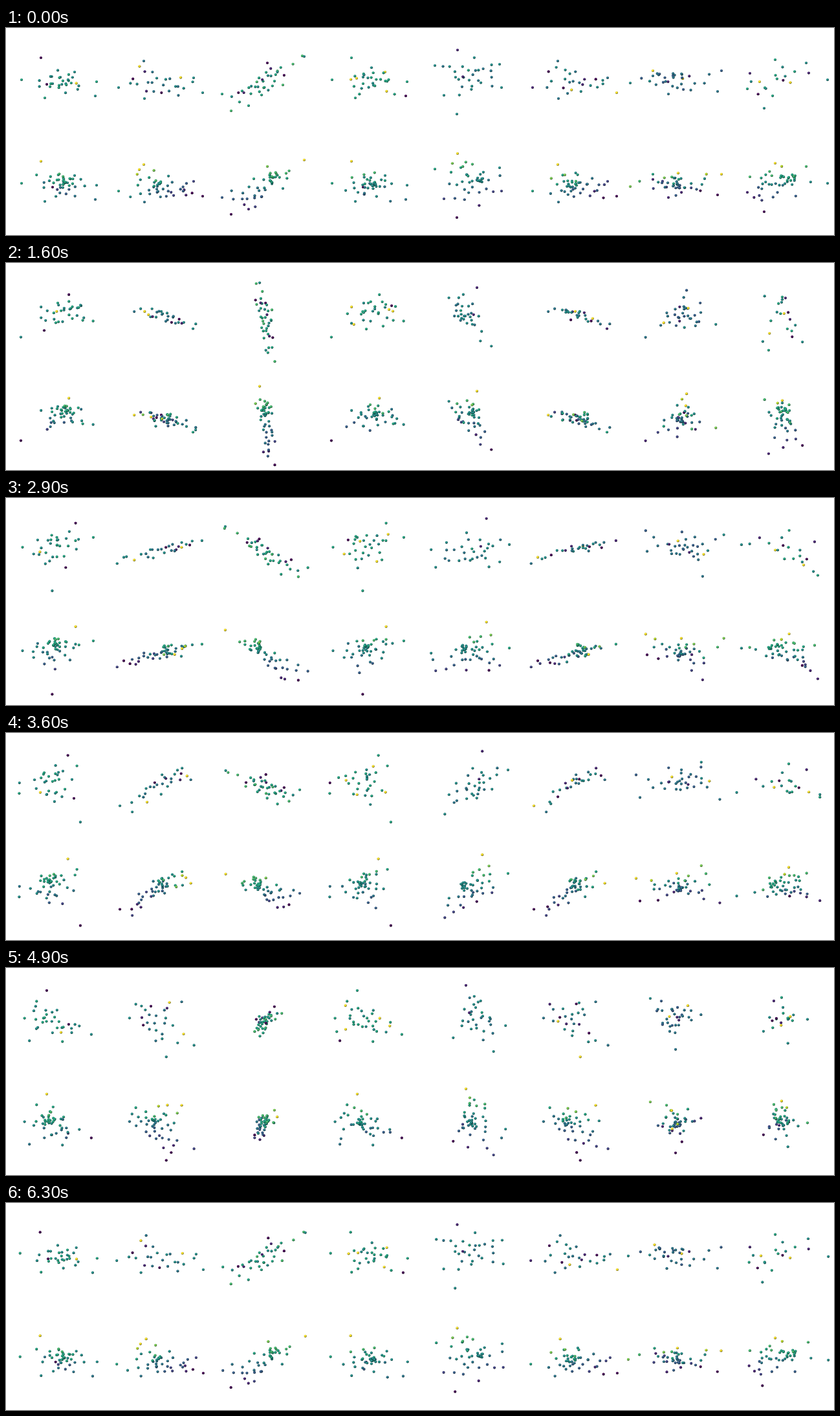
Recreate the animation shown at these times as an HTML page. Size 1280x320 px, loop 6.4 s.

```html
<!DOCTYPE html>
<html lang="en">
<head>
<meta charset="utf-8">
<title>Orbiting point clouds</title>
<style>
  html, body { margin: 0; width: 100%; height: 100%; overflow: hidden; background: #fff; }
  #stage { display: block; width: 1280px; height: 320px; }
</style>
</head>
<body>
<svg id="stage" viewBox="0 0 1280 320"><defs id="defs"></defs></svg>
<script>
const NS = 'http://www.w3.org/2000/svg';
const LOOP = 6400, STEPS = 64, CELL = 160;
const FOCUS = 298, SIN = 0.41, COS = 0.912; // perspective distance and camera tilt
const VIRIDIS = ['#440154', '#482475', '#414487', '#355f8d', '#2a788e', '#21918c',
  '#22a884', '#44bf70', '#7ad151', '#bddf26', '#fde725'];
const TOP_LEVEL = VIRIDIS.length - 1;

const stage = document.getElementById('stage');
const defs = document.getElementById('defs');

function add(parent, tag, attrs) {
  const el = document.createElementNS(NS, tag);
  for (const key in attrs) el.setAttribute(key, attrs[key]);
  return parent.appendChild(el);
}

function randomFrom(seed) {
  return () => {
    seed = (seed + 0x6D2B79F5) | 0;
    let t = Math.imul(seed ^ (seed >>> 15), 1 | seed);
    t = (t + Math.imul(t ^ (t >>> 7), 61 | t)) ^ t;
    return ((t ^ (t >>> 14)) >>> 0) / 4294967296;
  };
}

VIRIDIS.forEach((color, i) => {
  const ball = add(defs, 'radialGradient', { id: 'ball' + i, cx: .42, cy: .36, r: .64 });
  const stop = (offset, tint) =>
    add(ball, 'stop', { offset, style: `stop-color:color-mix(in srgb, ${color}, ${tint})` });
  stop(0, 'white 12%');
  stop(.45, 'black 5%');
  stop(1, 'black 65%');
});

// Starting view (x right, y down, d towards the viewer) to world coordinates.
function toWorld([x, y, d]) {
  const z = (-y * (FOCUS - d * COS) + FOCUS * d * SIN) / (FOCUS * COS - y * SIN);
  return { x: x * (FOCUS - d * COS - z * SIN) / FOCUS, d, z };
}

// A shape is its dense core followed by its outermost tips.
function shape(tone, atoms, core, ...tips) {
  return { tone, atoms, core: toWorld(core), tips: tips.map(toWorld) };
}

const bent = shape(5.5, 32, [7, -1, 12], [-26, -34, 15], [-56, 0, 32], [-20, 28, 52],
  [58, 25, 42], [60, 3, 0], [26, -12, -28], [-8, 6, -58]);
const sheet = shape(4.6, 27, [-5, 5, 14], [-66, 12, 40], [-26, 29, 50], [-27, -29, -37],
  [64, 20, 0], [50, -3, -38]);
const rod = shape(5.8, 38, [11, -8, 1], [61, -36, -9], [4, -26, -14], [28, 8, 12],
  [-52, 48, 14], [-66, 22, 4], [-25, 40, 6]);
const fan = shape(4.8, 31, [9, -5, 0], [-22, -46, 7], [-57, -22, -10], [43, -24, -40],
  [46, 12, -25], [-23, 53, 30], [-43, 24, 12]);
const bar = shape(3.8, 33, [0, 2, 3], [66, -14, 14], [-75, 5, 45], [-40, -6, -45],
  [-40, -14, -20], [-16, 22, 25], [60, 18, 10]);
const wing = shape(5.6, 20, [10, -6, 2], [-11, -31, 0], [37, -26, -30], [70, 0, 0],
  [-54, 14, -18], [-28, 44, 30], [-50, -10, 10]);

const distance = (a, b) => Math.hypot(a.x - b.x, a.d - b.d, a.z - b.z);

function jitter(rand, p, size) {
  const noise = () => (rand() + rand() + rand() - 1.5) * size;
  return { x: p.x + noise(), d: p.d + noise(), z: p.z + noise() };
}

// Random mix of the corners; most of the weight falls on one or two of them.
function blend(rand, corners) {
  const weights = corners.map(() => rand() ** 3);
  const total = weights.reduce((a, b) => a + b);
  const mix = key => corners.reduce((sum, c, i) => sum + c[key] * weights[i], 0) / total;
  return { x: mix('x'), d: mix('d'), z: mix('z') };
}

// Fill the hull evenly: of several candidates keep the one furthest from the others.
function fill(rand, points, count, corners) {
  const gap = p => Math.min(...points.map(q => distance(p, q)));
  while (points.length < count) {
    const options = Array.from({ length: 5 }, () => jitter(rand, blend(rand, corners), 7));
    points.push(options.reduce((a, b) => gap(a) > gap(b) ? a : b));
  }
}

const toLevel = value => Math.round(Math.max(0, Math.min(TOP_LEVEL, value)));

// Upper row: mostly the shape's tone, with a few dark and bright points.
function atomCloud({ tone, atoms, core, tips }, rand) {
  const points = tips.map(p => ({ ...p }));
  fill(rand, points, atoms, [core, ...tips]);
  for (const p of points) {
    const kind = rand();
    p.level = kind < .14 ? toLevel(rand())
      : kind > .94 ? TOP_LEVEL
      : toLevel(tone + (rand() - .5) * 1.8);
  }
  return points;
}

// Lower row: a tight core, coloured by height above or below it.
function heightCloud({ tone, core, tips }, rand) {
  const points = tips.map(p => ({ ...p }));
  fill(rand, points, 33, [core, ...tips]);
  for (let i = 0; i < 12; i++) points.push(jitter(rand, core, 9));
  const heights = points.map(p => p.z);
  const low = Math.min(...heights), high = Math.max(...heights);
  for (const p of points) {
    const rise = p.z - core.z;
    p.level = toLevel(rise > 0
      ? tone + (TOP_LEVEL - tone) * (rise / (high - core.z)) ** 1.2
      : tone - tone * (rise / (low - core.z)) ** 1.2);
  }
  return points;
}

function place(points, col, row) {
  const half = CELL / 2;
  const group = add(stage, 'svg', {
    x: col * CELL, y: row * CELL, width: CELL, height: CELL,
    viewBox: `${-half} ${-half} ${CELL} ${CELL}`
  });
  for (const p of points) p.dot = add(group, 'circle', { r: 2.1, fill: `url(#ball${p.level})` });
  return { group, points };
}

const clouds = [bent, sheet, rod, bent, fan, sheet, bar, wing].flatMap((form, col) => [
  place(atomCloud(form, randomFrom(col + 11)), col, 0),
  place(heightCloud(form, randomFrom(col + 31)), col, 1)
]);

function draw(step) {
  const angle = step / STEPS * 2 * Math.PI;
  const cos = Math.cos(angle), sin = Math.sin(angle);
  for (const { group, points } of clouds) {
    for (const p of points) {
      const x = p.x * cos + p.d * sin, d = p.d * cos - p.x * sin;
      p.depth = d * COS + p.z * SIN;
      const scale = FOCUS / (FOCUS - p.depth);
      p.dot.setAttribute('cx', (x * scale).toFixed(2));
      p.dot.setAttribute('cy', ((d * SIN - p.z * COS) * scale).toFixed(2));
    }
    points.sort((a, b) => a.depth - b.depth);
    group.append(...points.map(p => p.dot));
  }
}

const start = performance.now();
let shown = -1;

function tick() {
  const time = (performance.now() - start) % LOOP;
  const step = Math.floor(time / LOOP * STEPS);
  if (step !== shown) draw(shown = step);
  requestAnimationFrame(tick);
}
tick();
</script>
</body>
</html>
```
